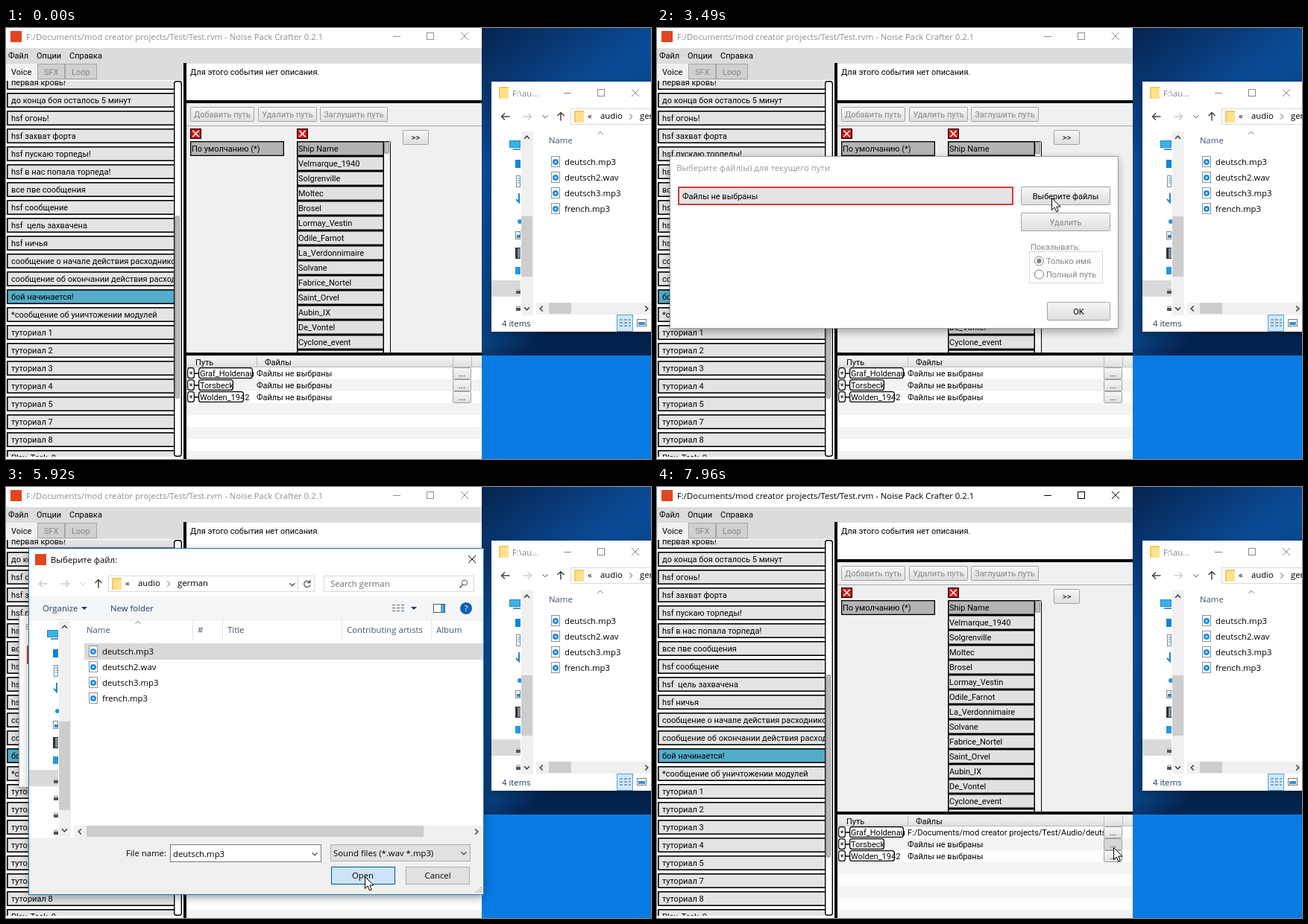
Animation, 865 px wide and 579 px high, one loop 8 s. Source, as an HTML page:

```html
<!DOCTYPE html>
<html lang="ru">
<head>
<meta charset="utf-8">
<title>Sound file picker</title>
<style>
html, body { margin: 0; width: 100%; height: 100%; overflow: hidden; background: #fff; }
svg { display: block; width: 100%; height: 100%; }
text { white-space: pre; }
.app { font: 11px Roboto, sans-serif; }
.sys { font: 11.35px "Open Sans", "Noto Sans", sans-serif; }
</style>
</head>
<body>
<svg id="stage" viewBox="0 0 865 579" preserveAspectRatio="none">
  <defs>
    <linearGradient id="sky" x2="0.3" y2="1">
      <stop offset="0" stop-color="#06234f"/><stop offset=".3" stop-color="#0a4c97"/>
      <stop offset=".68" stop-color="#08407f"/><stop offset=".76" stop-color="#042450"/>
    </linearGradient>
    <linearGradient id="button" x2="0" y2="1">
      <stop offset="0" stop-color="#f7f7f7"/><stop offset="1" stop-color="#dedede"/>
    </linearGradient>
    <clipPath id="events"><rect y="71" width="226" height="505"/></clipPath>
    <clipPath id="ships"><rect x="390" y="152" width="130" height="284"/></clipPath>
    <clipPath id="files"><rect x="336" y="456" width="263" height="50"/></clipPath>
  </defs>
  <g id="scene"></g>
</svg>
<script>
const LOOP = 8000;
const GREY = '#858585', HEADING = '#43566f';
const NO_FILES = 'Файлы не выбраны';
const SOUNDS = ['deutsch.mp3', 'deutsch2.wav', 'deutsch3.mp3', 'french.mp3'];
const EVENTS = ['первая кровь!', 'до конца боя осталось 5 минут', 'hsf огонь!', 'hsf захват форта',
  'hsf пускаю торпеды!', 'hsf в нас попала торпеда!', 'все пве сообщения', 'hsf сообщение',
  'hsf  цель захвачена', 'hsf ничья', 'сообщение о начале действия расходников',
  'сообщение об окончании действия расходников', 'бой начинается!', '*сообщение об уничтожении модулей',
  ...[1, 2, 3, 4, 5, 7, 8].map(n => 'туториал ' + n), 'Play_Task_0'];
const SHIPS = ['Ship Name', 'Velmarque_1940', 'Solgrenville', 'Moltec', 'Brosel', 'Lormay_Vestin',
  'Odile_Farnot', 'La_Verdonnimaire', 'Solvane', 'Fabrice_Nortel', 'Saint_Orvel', 'Aubin_IX',
  'De_Vontel', 'Cyclone_event', ''];
const ROUTES = [['Graf_Holdenau', 73], ['Torsbeck', 47], ['Wolden_1942', 61]];

// Drawing helpers; text is placed by its vertical middle.
const rect = (x, y, w, h, fill, stroke, sw = 1, r = 0) => {
  const i = stroke ? sw / 2 : 0;
  return `<rect x="${x + i}" y="${y + i}" width="${w - 2 * i}" height="${h - 2 * i}" rx="${r}" fill="${fill}"` +
    (stroke ? ` stroke="${stroke}" stroke-width="${sw}"/>` : '/>');
};
const label = font => (x, y, s, fill = '#000', anchor = 'start') =>
  `<text class="${font}" x="${x}" y="${y + 4}" fill="${fill}" text-anchor="${anchor}">${s}</text>`;
const app = label('app'), sys = label('sys');
const line = (d, stroke = '#000', sw = 1, fill = 'none') =>
  `<path d="${d}" fill="${fill}" stroke="${stroke}" stroke-width="${sw}"/>`;
const dot = (x, y, r, fill, stroke = 'none') =>
  `<circle cx="${x}" cy="${y}" r="${r}" fill="${fill}" stroke="${stroke}"/>`;
const move = (x, y, body) => `<g transform="translate(${x} ${y})">${body}</g>`;
const chevron = (x, y, angle, c = '#555', sw = 1.3) =>
  `<path d="M-3.5 1.8L0-1.8L3.5 1.8" transform="translate(${x} ${y}) rotate(${angle})" fill="none" stroke="${c}" stroke-width="${sw}"/>`;
const arrow = (x, y, angle, c) =>
  `<path d="M5.5 0H-5.5M-1-4.5L-5.5 0L-1 4.5" transform="translate(${x} ${y}) rotate(${angle})" fill="none" stroke="${c}" stroke-width="1.5"/>`;
const cross = (x, y, r, c, sw = 1) => line(`M${x - r} ${y - r}l${2 * r} ${2 * r}m0 ${-2 * r}l${-2 * r} ${2 * r}`, c, sw);
const button = (x, y, w, h, s, c = '#000', fill = 'url(#button)') =>
  rect(x, y, w, h, fill, '#a2a2a2', 1, 1) + app(x + w / 2, y + h / 2, s, c, 'middle');
const windowButtons = (x, y, c) =>
  line(`M${x - 5} ${y + .5}h10`, c) + rect(x + 40, y - 5, 10, 10, 'none', c) + cross(x + 91, y, 5, c);
const folder = (x, y) => rect(x, y, 13, 16, '#f6c95b') + rect(x + 2, y + 2, 11, 14, '#ffe08f');
const shadow = (x, y, w, h) =>
  `<rect x="${x}" y="${y + 4}" width="${w}" height="${h}" fill="#000" opacity=".32" style="filter:blur(6px)"/>`;
const popup = (cx, cy, [opacity, scale], body) =>
  `<g opacity="${opacity}" transform="translate(${cx} ${cy}) scale(${scale}) translate(${-cx} ${-cy})">${body}</g>`;

const between = (t, a, b) => t >= a && t < b;

function desktop() {
  return rect(638, 0, 227, 579, 'url(#sky)') + rect(638, 440, 227, 139, '#087be2');
}

// Breadcrumb row shared by both file windows.
function navigation(active) {
  const c = active ? '#444' : '#ccc';
  return arrow(670, 119, 0, c) + arrow(699, 119, 180, '#ccc') + chevron(723, 119, 180, c, 1) +
    arrow(744, 119, 90, '#444') + folder(762, 111) + sys(780, 118, '«') + sys(797, 118, 'audio') +
    chevron(838, 119, 90, '#555', 1) + sys(850, 118, 'german');
}

// Side tree and file list shared by both file windows.
function filePane(bottom, thumbY, thumbH, rowFill) {
  let s = rect(651, 339, 39, 22, '#d9d9d9') +
    rect(675, 151, 15, 10, '#35b4ee', '#2b82b8') + rect(680, 162, 10, 2, '#5792b5') +
    rect(683, 177, 7, 11, '#0b86dd') + rect(684, 198, 6, 16, '#fff', '#78909f') +
    line('M686 202h4m-4 3h4m-4 3h4', '#4a95d0') + line('M688 222v12l-4-4', '#1b86dc', 2) +
    dot(689, 260, 3, '#2494e0') + rect(683, 273, 7, 11, '#eef5fa', '#7d8d98') + rect(685, 278, 5, 4, '#3c82b6') +
    rect(683, 295, 7, 15, '#333') + rect(686, 296, 4, 13, '#7b8b9b') + rect(683, 321, 7, 10, '#2199e5');
  for (let y = 353; y < bottom; y += 23) s += rect(684, y, 6, 4, '#555') + rect(684, y - 3, 6, 3, '#c8c8c8');
  s += rect(691, 139, 16, bottom - 139, '#f0f0f0') + rect(691, thumbY, 15, thumbH, '#cdcdcd') +
    chevron(698.5, 147, 0, '#444', 1.6) + chevron(698.5, bottom - 9, 180, '#444', 1.6);
  if (rowFill) s += rect(725, 169, 535, 22, rowFill);
  s += sys(728, 151, 'Name', HEADING) + chevron(797, 141, 0, '#777', 1);
  return s + SOUNDS.map((name, i) => {
    const y = 180 + 21 * i;
    return rect(731, y - 8, 12, 15, '#fff', '#8b9299') + dot(737, y, 4, '#1f8fdf') + dot(737, y, 1.3, '#fff') +
      sys(749, y, name);
  }).join('');
}

function explorer() {
  return shadow(651, 73, 220, 335) + rect(651, 72, 214, 336, '#fff') + folder(661, 79) +
    sys(679, 88, 'F:\\au...', GREY) + windowButtons(753, 87, '#888') +
    rect(757, 108, 120, 22, '#fff', '#d9d9d9') + navigation(true) + filePane(386, 253, 81) +
    rect(711, 369, 154, 16, '#f0f0f0') + rect(728, 369, 30, 15, '#cdcdcd') +
    chevron(718, 377, -90, '#444', 1.6) + chevron(859, 377, 90, '#444', 1.6) +
    sys(665, 397, '4 items', '#26384f') + rect(819, 385, 22, 23, '#cce8ff', '#4da6d8') +
    line('M823 392h4m2 0h4m2 0h3m-15 4h4m2 0h4m2 0h3m-15 4h4m2 0h4m2 0h3', '#556') +
    rect(846, 391, 13, 10, '#fff', '#777') + rect(848, 395, 9, 4, '#3b8fd0');
}

function mainWindow(t) {
  const titleColor = t >= 7160 ? '#000' : '#8f8f8f';
  let s = rect(0, 0, 638, 579, '#f0f0f0') + rect(0, 0, 638, 27, '#fff') + rect(6, 4, 15, 15, '#e2451f') +
    sys(27, 12, 'F:/Documents/mod creator projects/Test/Test.rvm - Noise Pack Crafter 0.2.1', titleColor) +
    windowButtons(524, 11, titleColor) + rect(0, 27, 638, 21, '#dcdcdc') +
    app(3, 37, 'Файл') + app(41, 37, 'Опции') + app(85, 37, 'Справка') +
    rect(0, 48, 238, 23, '#dcdcdc') + rect(0, 48, 42, 23, '#f1f1f1') +
    rect(42, 48, 37, 21, '#d0d0d0', '#a6a6a6') + rect(79, 48, 43, 21, '#d0d0d0', '#a6a6a6') +
    app(7, 59, 'Voice') + app(51, 59, 'SFX', GREY) + app(88, 59, 'Loop', GREY);

  s += rect(0, 70, 238, 509, '#fff') + '<g clip-path="url(#events)">' + EVENTS.map((name, i) =>
    rect(1, 63 + 24 * i, 232, 20, i === 12 ? '#54adc8' : '#e4e4e4', '#000', 1.6) + app(7, 73 + 24 * i, name)).join('') +
    '</g>' + rect(225, 71, 11, 505, '#fff', '#000', 1.4, 3) + rect(227, 252, 6, 246, '#bcbcbc', '#999', 1, 2) +
    rect(238, 47, 4, 532, '#000');

  s += rect(242, 48, 395, 49, '#fff') + app(247, 59, 'Для этого события нет описания.') + rect(242, 97, 396, 4, '#000') +
    button(247, 106, 86, 20, 'Добавить путь', GREY) + button(338, 106, 79, 20, 'Удалить путь', GREY) +
    button(421, 106, 91, 20, 'Заглушить путь', GREY) + rect(242, 131, 396, 1, '#a5a5a5');
  for (const x of [247, 390]) s += rect(x, 135, 15, 14, '#d71919', '#200', 1.2) + cross(x + 7.5, 142, 4.2, '#fff', 1.5);
  s += rect(247, 152, 126, 20, '#b4b4b4', '#000', 1.3) + app(249, 162, 'По умолчанию (*)') +
    '<g clip-path="url(#ships)">' + SHIPS.map((name, i) =>
      rect(390, 152 + 20 * i, 117, 20, i ? '#e1e1e1' : '#b4b4b4', '#000', 1.5) + app(392, 162 + 20 * i, name)).join('') +
    rect(506, 152, 10, 300, '#f4f4f4', '#000', 1, 2) + rect(507, 153, 7, 16, '#bdbdbd', '#888', 1, 2) + '</g>' +
    button(532, 137, 35, 20, '&gt;&gt;') + rect(242, 436, 396, 4, '#000');

  s += rect(242, 440, 396, 139, '#fff') + rect(242, 440, 396, 16, 'url(#button)');
  for (let y = 472; y < 579; y += 32) s += rect(242, y, 396, 16, '#f3f3f3');
  s += app(254, 449, 'Путь') + app(347, 449, 'Файлы') + line('M336.5 441v14M599.5 441v14M624.5 441v14M242 455.5h396', '#bcbcbc');
  const hovered = t >= 7960 ? 1 : between(t, 1230, 1840) ? 0 : -1;
  ROUTES.forEach(([name, w], i) => {
    const y = 464 + 16 * i;
    const file = i === 0 && t >= 7340 ? 'F:/Documents/mod creator projects/Test/Audio/deutsch.mp3.wav' : NO_FILES;
    s += line(`M253 ${y}h5`, '#000', 1.5) + rect(243, y - 8, 10, 15, '#fff', '#000', 1.2, 3) + app(248, y + 1, '*', '#000', 'middle') +
      rect(258, y - 8, w, 15, '#fff', '#000', 1.2, 3) + app(260, y - .5, name) +
      `<g clip-path="url(#files)">${app(336, y - .5, file)}</g>` +
      button(599, y - 8, 25, 16, '...', '#000', i === hovered ? '#d6d6d6' : undefined);
  });
  return s;
}

function pathDialog(t) {
  const chosen = t >= 6350;
  const active = between(t, 1620, 3280) || chosen;
  const ink = chosen ? '#000' : GREY;
  return shadow(18, 172, 600, 232) + rect(17, 172, 602, 232, '#fff', active ? '#2384cf' : '#9c9c9c') +
    sys(26, 188, 'Выберите файл(ы) для текущего пути', active ? '#000' : '#999') +
    rect(28, 213, 450, 25, chosen ? '#c0dfba' : '#e4e4e4', chosen ? '#000' : '#d93a3a', 2) +
    app(34, 226, chosen ? 'deutsch.mp3.wav' : NO_FILES) +
    button(488, 213, 120, 25, 'Выберите файлы', '#000', between(t, 2850, 3060) ? '#cfcfcf' : undefined) +
    button(488, 248, 120, 25, 'Удалить', GREY) + app(501, 294, 'Показывать:', ink) +
    rect(499, 300, 99, 43, '#fdfdfd', '#d8d8d8') + dot(512.5, 313, 6, '#fff', ink) + dot(512.5, 313, 3.2, ink) +
    app(522, 313, 'Только имя', ink) + dot(512.5, 331, 6, '#fff', '#777') + app(522, 331, 'Полный путь', ink) +
    button(523, 368, 85, 25, 'OK', '#000', t >= 7160 ? '#cdcdcd' : undefined);
}

function fileDialog(t) {
  const picked = t >= 4720, pressed = t >= 5920;
  const rowFill = pressed ? '#d9d9d9' : picked ? '#cce8ff' : '#e5f3ff';
  let s = shadow(30, 82, 611, 466) + rect(30, 82, 611, 466, '#fff', '#1979ca') +
    rect(39, 90, 15, 15, '#e2451f') + sys(60, 98, 'Выберите файл:') + cross(625, 97, 5, '#000') +
    rect(137, 119, 277, 22, '#fff', '#d9d9d9') + move(-620, 11, navigation(false)) +
    chevron(384, 131, 180) + line('M391.5 120v20', '#d9d9d9') + line('M407 127.5a4.2 4.2 0 1 0 1 4M408 125v3.5h-4', '#555', 1.3) +
    rect(426, 119, 202, 22, '#fff', '#d9d9d9') + sys(435, 130, 'Search german', '#6d6d6d') +
    dot(615, 128.5, 3.5, 'none', '#555') + line('M612.5 131l-4 4.5', '#555', 1.5);
  s += rect(31, 147, 609, 31, '#f5f6f7') + rect(31, 178, 609, 1, '#e5e5e5') + sys(49, 163, 'Organize', '#1e395b') +
    line('M101 161h8l-4 4z', 'none', 0, '#1e395b') + sys(140, 163, 'New folder', '#1e395b') +
    line('M518 158.5h4m2 0h4m2 0h4m-16 4h4m2 0h4m2 0h4m-16 4h4m2 0h4m2 0h4', '#666') +
    line('M543 161h8l-4 4z', 'none', 0, '#1e395b') + rect(573, 157, 16, 12, '#fff', '#555') + rect(583, 158, 5, 10, '#42a5dc') +
    dot(617, 163, 8, '#0b61b6') + `<text class="sys" x="617" y="167" fill="#fff" text-anchor="middle" font-weight="700">?</text>`;
  s += move(-620, 41, filePane(429, 274, 119, rowFill)) + line('M250.5 179v27M290.5 179v27M450.5 179v27M570.5 179v27', '#e5e5e5');
  for (const [x, name] of [[257, '#'], [297, 'Title'], [457, 'Contributing artists'], [577, 'Album']]) s += sys(x, 192, name, HEADING);
  s += rect(91, 455, 549, 16, '#f0f0f0') + rect(108, 455, 452, 15, '#cdcdcd') +
    chevron(99, 463, -90, '#444', 1.6) + chevron(631, 463, 90, '#444', 1.6) + rect(31, 471, 609, 76, '#f0f0f0') +
    sys(215, 492, 'File name:', '#000', 'end') + rect(220, 480, 203, 24, '#fff', picked ? '#7a7a7a' : '#0078d7') +
    chevron(414, 493, 180) + (picked ? sys(224, 493, SOUNDS[0]) : t < 4300 ? rect(224, 484, 1, 16, '#000') : '') +
    rect(435, 480, 188, 23, '#e1e1e1', '#adadad') + sys(439, 492, 'Sound files (*.wav *.mp3)') + chevron(614, 492, 180) +
    (pressed ? rect(436, 510, 86, 24, '#cce4f7', '#005499') : rect(436, 510, 86, 24, t >= 5720 ? '#e5f1fb' : '#e1e1e1', '#0078d7', 2)) +
    sys(478.5, 522, 'Open', '#000', 'middle') + rect(536, 510, 86, 24, '#e1e1e1', '#adadad') + sys(579, 522, 'Cancel', '#000', 'middle');
  for (let i = 0; i < 6; i++) s += rect([636, 636, 633, 636, 633, 630][i], [537, 540, 540, 543, 543, 543][i], 2, 2, '#bcbcbc');
  return s;
}

// Pointer strokes: start, end, number of jumps, from, to.
const STROKES = [
  [200, 1230, 6, [735, 588], [605, 463]],
  [1840, 2650, 5, [605, 463], [529, 228]],
  [4930, 5720, 5, [529, 228], [481, 523]],
  [6350, 6960, 4, [481, 523], [559, 377]],
  [7550, 7960, 3, [559, 377], [612, 484]],
];
function pointer(t) {
  const stroke = STROKES.filter(s => t >= s[0]).pop();
  if (!stroke) return '';
  const [start, end, jumps, from, to] = stroke;
  const step = Math.floor((t - start) / (end - start) * (jumps - 1) + 1.001);
  const p = Math.min(1, step / jumps);
  const [x, y] = from.map((v, i) => Math.round(v + (to[i] - v) * p));
  return move(x + .5, y + .5, line('M0 0V16L3.7 12.5L6.2 18.5L8.8 17.4L6.3 11.6H11.5Z', '#000', 1, '#fff'));
}

function scene(t) {
  let s = desktop() + explorer() + mainWindow(t);
  if (between(t, 1620, 7550)) {
    const pose = t < 1840 ? [.32, .967] : t >= 7340 ? [.3, .95] : [1, 1];
    s += popup(318, 288, pose, pathDialog(t));
  }
  if (between(t, 3690, 6350)) {
    const pose = t < 3910 ? [.55, .975] : t >= 6140 ? [.35, .95] : [1, 1];
    s += popup(335.5, 315, pose, fileDialog(t));
  }
  return s + pointer(t);
}

const root = document.getElementById('scene');
const begin = performance.now();
let shown = '';
function tick() {
  const next = scene((performance.now() - begin) % LOOP);
  if (next !== shown) root.innerHTML = shown = next;
  requestAnimationFrame(tick);
}
tick();
</script>
</body>
</html>
```
